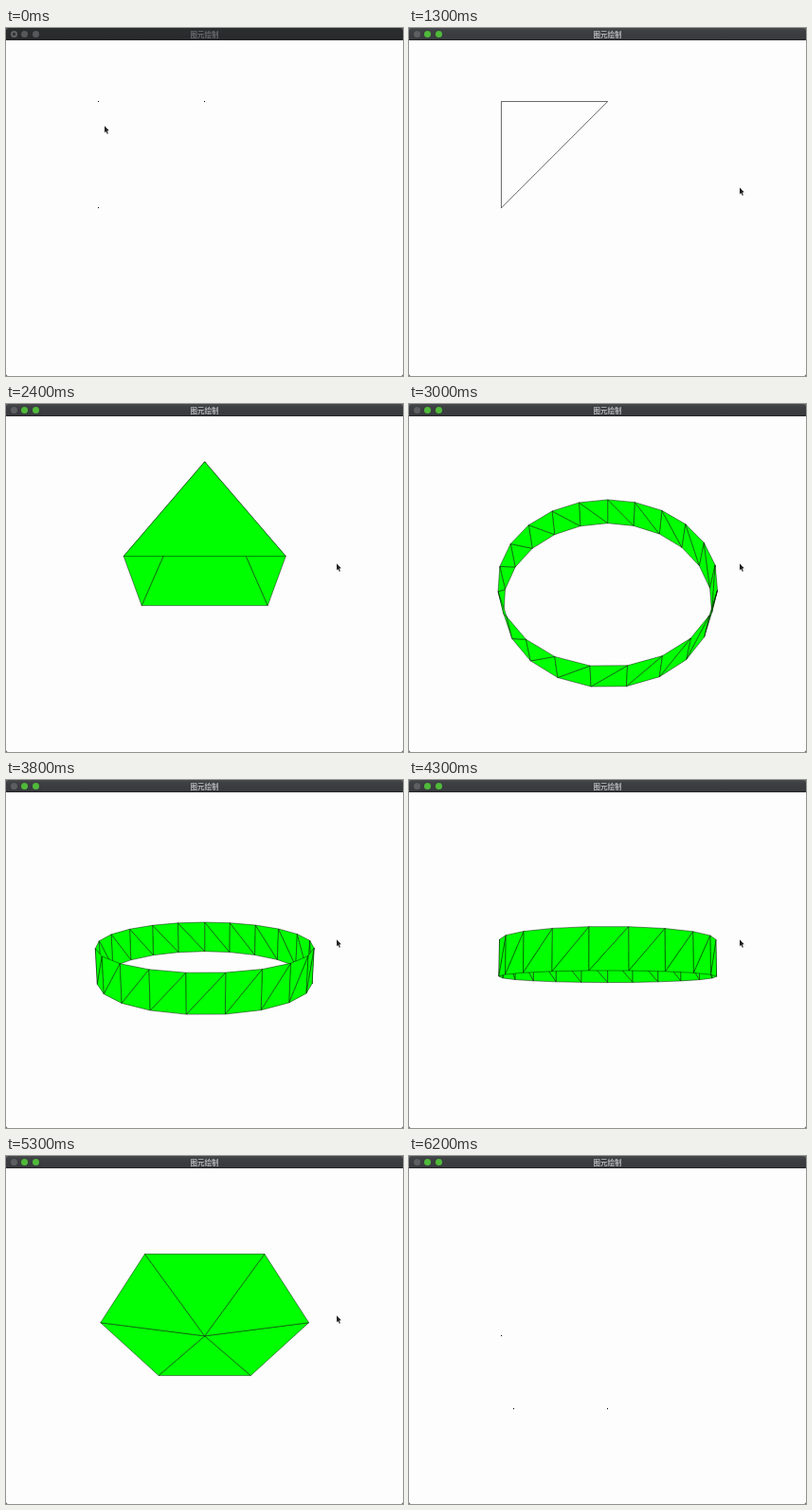
Animation, 419 px wide and 367 px high, one loop 6300 ms. Source, as an HTML page with a canvas:

```html
<!DOCTYPE html>
<html lang="zh">
<head>
<meta charset="utf-8">
<style>
  html, body { margin: 0; width: 100%; height: 100%; overflow: hidden; background: #222; }
  #window { position: relative; width: 419px; height: 367px; overflow: hidden; border-radius: 2px; background: #fdfdfd; }
  #bar { position: absolute; inset: 0 0 auto; height: 13px; box-sizing: border-box; border-bottom: 1px solid #242628;
    background: linear-gradient(#2c2e30, #27292b); color: #66686b;
    font: 700 7.5px/13px "Noto Sans CJK SC", "Noto Sans CJK", sans-serif; text-align: center; }
  #bar.active { background: linear-gradient(#484a4c, #3d3f42 25%, #37393c); color: #b4b5b7; }
  #bar i { position: absolute; top: 3px; width: 7px; height: 7px; border-radius: 50%; background: #56585a; }
  #bar i:nth-of-type(1) { left: 5px; }
  #bar i:nth-of-type(2) { left: 16px; }
  #bar i:nth-of-type(3) { left: 28px; }
  #bar i:first-of-type { background: radial-gradient(#333 1.2px, #626466 2px); }
  #bar.active i { background: #4fba39; }
  #bar.active i:first-of-type { background: #5c5e60; }
  canvas { position: absolute; left: 0; top: 0; }
</style>
</head>
<body>
<div id="window">
  <canvas width="419" height="367"></canvas>
  <div id="bar"><i></i><i></i><i></i>图元绘制</div>
</div>
<script>
const ctx = document.querySelector('canvas').getContext('2d');
const bar = document.getElementById('bar');
const LOOP = 6300, DISTANCE = 15;
const FOCAL = 177 / Math.tan(17.5 * Math.PI / 180);

// Geometry
const corner = [[3, 3, 0], [0, 3, 0], [3, 0, 0]];

const base = [[-2, 0, -2], [2, 0, -2], [2, 0, 2], [-2, 0, 2]];
const pyramid = base.map((p, i) => [p, base[(i + 1) % 4], [0, 4, 0]]);

const rim = [];
for (let i = 0; i <= 21; i++) {
  const a = i % 21 * 0.3;
  for (const z of [-0.5, 0.5]) rim.push([3 * Math.sin(a), 3 * Math.cos(a), z]);
}
const ring = rim.slice(2).map((p, i) => [rim[i], rim[i + 1], p]);

const hexPoint = i => [3 * Math.cos(i * Math.PI / 3), 3 * Math.sin(i * Math.PI / 3), -0.5];
const fan = Array.from({ length: 6 }, (_, i) => [[0, 0, 0], hexPoint(i), hexPoint(i + 1)]);

// Camera: half turn about y, then the tilt about x
function project([x, y, z], tilt) {
  const c = Math.cos(tilt), s = Math.sin(tilt);
  const depth = DISTANCE - (y * s - z * c);
  const k = FOCAL / depth;
  return [209.7 - x * k, 189.8 - (y * c + z * s) * k, depth];
}

function trace(points, closed) {
  ctx.beginPath();
  for (const [x, y] of points) ctx.lineTo(x, y);
  if (closed) ctx.closePath();
}

const drawPoints = tilt => {
  ctx.fillStyle = '#000';
  for (const p of corner) {
    const [x, y] = project(p, tilt);
    ctx.fillRect(Math.floor(x), Math.floor(y), 1, 1);
  }
};

const drawLines = (count, closed) => tilt => {
  ctx.lineWidth = 0.6;
  trace(corner.slice(0, count).map(p => project(p, tilt)), closed);
  ctx.stroke();
};

// Shared edges are stroked by both faces, so each stroke is thin
const drawMesh = mesh => tilt => {
  const depth = t => t[0][2] + t[1][2] + t[2][2];
  const faces = mesh.map(t => t.map(p => project(p, tilt)));
  faces.sort((a, b) => depth(b) - depth(a));
  ctx.lineWidth = 0.45;
  ctx.fillStyle = '#00ff00';
  for (const face of faces) {
    trace(face, true);
    ctx.fill();
    ctx.stroke();
  }
};

// Timeline: [start, drawing] and runs of 5 degree key presses [start, count]
const modes = [
  [0, drawPoints], [600, drawLines(2)], [800, drawLines(3)], [1300, drawLines(3, true)],
  [1500, drawMesh(pyramid)], [2800, drawMesh(ring)], [4400, drawMesh(fan)], [6000, drawPoints]
];
const presses = [[1700, 1], [2200, 5], [2900, 4], [3400, 9], [4700, 9]];

function tiltAt(t) {
  let steps = 0;
  for (const [start, count] of presses)
    if (t >= start) steps += Math.min(count, 1 + Math.floor((t - start) / 100));
  return -steps * 5 * Math.PI / 180;
}

function drawCursor(t) {
  const u = Math.max(0, Math.min(1, (t - 100) / 400));
  const e = u * u * (3 - 2 * u);
  ctx.save();
  ctx.translate(104 + 245 * e, 103.3 + 65 * e);
  trace([[0, 0], [0, 7], [1.5, 5.6], [2.8, 8.4], [3.9, 7.9], [2.7, 5.2], [4.8, 5]], true);
  ctx.fillStyle = '#222';
  ctx.fill();
  ctx.restore();
}

function render(now) {
  const t = Math.floor(now % LOOP / 100) * 100;
  bar.className = t >= 300 ? 'active' : '';
  ctx.clearRect(0, 0, 419, 367);
  ctx.strokeStyle = '#000';
  ctx.lineJoin = 'round';
  modes.findLast(([start]) => t >= start)[1](tiltAt(t));
  if (t < 6000) drawCursor(t);
  requestAnimationFrame(render);
}
render(0);
</script>
</body>
</html>
```
